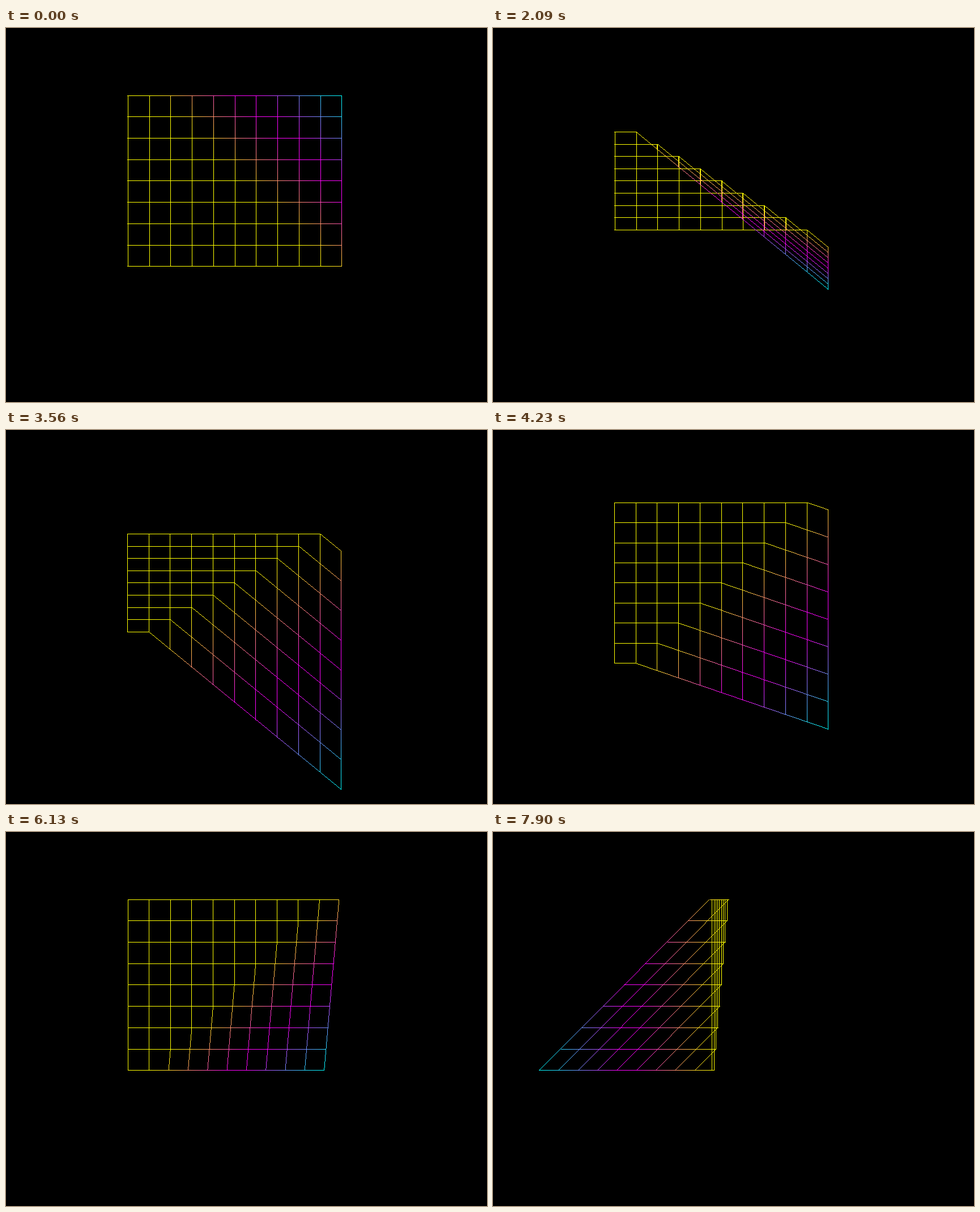
These frames come from a looping animation (849 by 660 pixels, 7990 ms). An HTML page with a canvas:

```html
<!DOCTYPE html>
<html lang="en">
<head>
<meta charset="utf-8">
<title>Rotating wireframe</title>
<style>
  html, body { margin: 0; width: 100%; height: 100%; overflow: hidden; background: #000; }
  canvas { display: block; }
</style>
</head>
<body>
<canvas id="stage" width="849" height="660"></canvas>
<script>
const W = 849, H = 660, LOOP = 7990;
const CX = 403.67, CY = 269.99, UNIT = 37.745;
const COLS = 5, ROWS = 4, PEAK = 9;

// Runs of 5 degree turns: first step, last step, number of steps
const RUNS = [
  [1000, 1700, 8], [1800, 2190, 5], [2390, 3170, 9], [3270, 3370, 2],
  [3560, 4230, 8], [4430, 4530, 2], [4730, 4830, 2], [5030, 5030, 1],
  [5930, 5930, 1], [6130, 6720, 7], [6920, 7700, 9], [7800, 7900, 2]
];
const steps = RUNS.flatMap(([from, to, count]) =>
  Array.from({ length: count }, (_, n) =>
    Math.ceil((from + (to - from) * n / Math.max(1, count - 1)) / 10) * 10));

const ctx = document.getElementById('stage').getContext('2d');
const image = ctx.createImageData(W, H);
const pixels = new Uint32Array(image.data.buffer);
const BLACK = 0xff000000;

const clamp = (v, max) => Math.min(max, Math.max(0, v));

// Tilt about the x axis first, then turn about the y axis
function pose(k) {
  if (k < 38) return { tilt: 5 * k, turn: 0 };
  return { tilt: 180, turn: 5 * (k < 50 ? k - 38 : k - 39) };
}

// Yellow - magenta - cyan by height, with a little extra contrast
function tint(z) {
  const t = 2 * z / PEAK;
  const rgb = t < 1 ? [1, 1 - t, t] : [2 - t, t - 1, 1];
  return rgb.map(c => clamp(255 * (0.5 + (c - 0.5) * 1.25), 255));
}

function plot(x, y, [r, g, b]) {
  if (x < 0 || y < 0 || x >= W || y >= H) return;
  pixels[y * W + x] = (BLACK | Math.round(b) << 16 | Math.round(g) << 8 | Math.round(r)) >>> 0;
}

// One sample per pixel along the longer axis
function line(p, q) {
  const dx = q.x - p.x, dy = q.y - p.y;
  const steep = Math.abs(dy) > Math.abs(dx);
  const from = steep ? p.y : p.x, span = steep ? dy : dx;
  const dir = span < 0 ? -1 : 1;
  const first = Math.floor(from), last = Math.floor(from + span);
  const count = Math.abs(last - first) + (steep ? 1 : 0);
  const side = steep ? -dir / 2 : 0;   // steep lines lie right of their heading
  for (let s = 0; s < count; s++) {
    const m = first + s * dir;
    const f = span ? clamp((m + 0.5 - from) / span, 1) : 0;
    const color = p.color.map((c, n) => c + (q.color[n] - c) * f);
    if (steep) plot(Math.floor(p.x + dx * f + side), m, color);
    else plot(m, Math.floor(p.y + dy * f), color);
  }
}

function draw(k) {
  const { tilt, turn } = pose(k);
  const a = tilt * Math.PI / 180, b = turn * Math.PI / 180;
  const point = (i, j) => {
    const z = Math.max(0, i + j);
    const y = j * Math.cos(a) - z * Math.sin(a);
    const depth = j * Math.sin(a) + z * Math.cos(a);
    const x = i * Math.cos(b) + depth * Math.sin(b);
    return { x: CX + UNIT * x, y: CY - UNIT * y, color: tint(z) };
  };
  pixels.fill(BLACK);
  for (let j = -ROWS; j <= ROWS; j++) {
    for (let i = -COLS; i <= COLS; i++) {
      const p = point(i, j);
      if (i < COLS) line(p, point(i + 1, j));
      if (j < ROWS) line(p, point(i, j + 1));
    }
  }
  ctx.putImageData(image, 0, 0);
}

let shown = -1;
const start = performance.now();
function tick() {
  const t = (performance.now() - start) % LOOP;
  const k = steps.filter(s => s <= t).length;
  if (k !== shown) draw(shown = k);
  requestAnimationFrame(tick);
}
tick();
</script>
</body>
</html>
```
